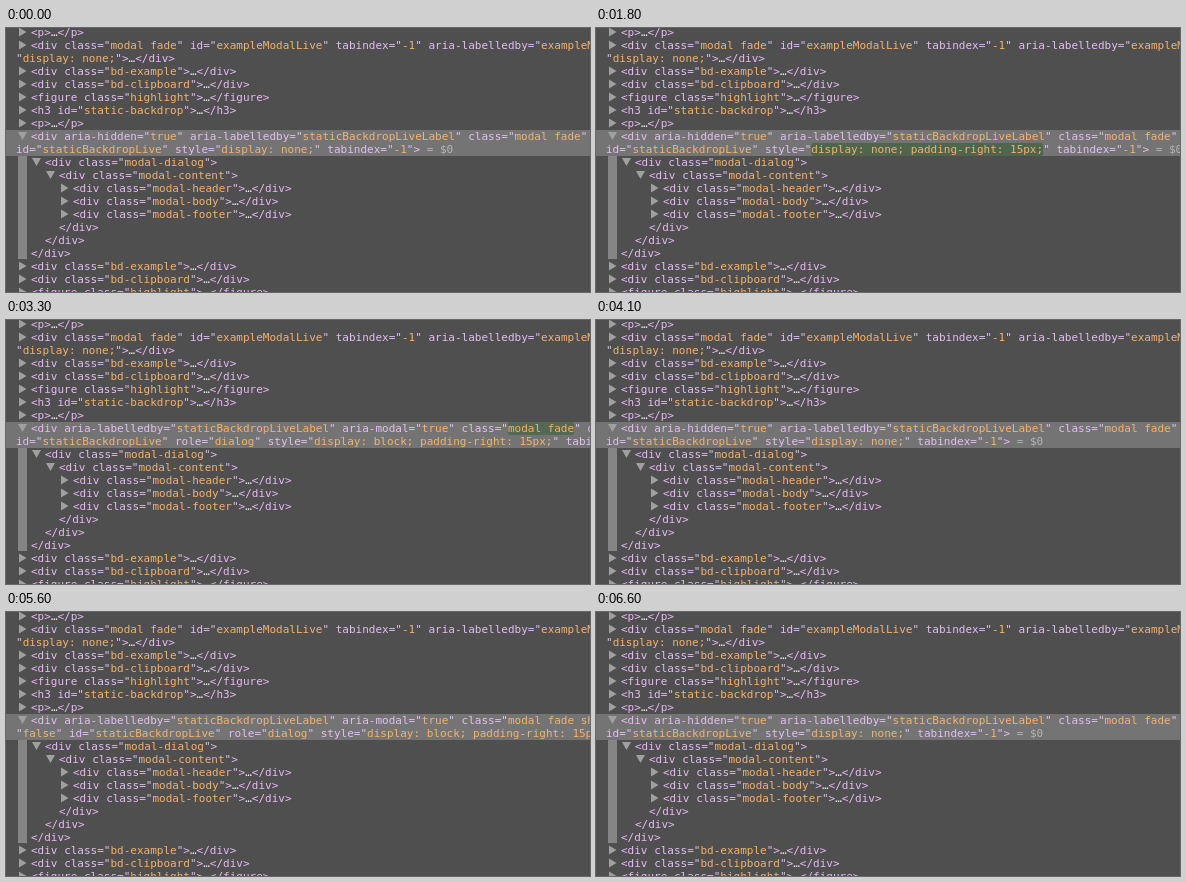
These frames come from a looping animation (584x264 px, 6.7 s). An HTML page:

```html
<!DOCTYPE html>
<html lang="en">
<head>
<meta charset="utf-8">
<title>Element inspector</title>
<style>
  html, body { margin: 0; width: 100%; height: 100%; overflow: hidden; background: #4f4f50; }
  svg { display: block; }
  text { font: 11px "DejaVu Sans Mono", monospace; white-space: pre; fill: #e8b9f4; }
  .attr { fill: #e2bff2; }
  .value { fill: #f3b26f; }
  .dots { fill: #e4e4e4; }
  .ref { fill: #b4b4b4; }
  .arrow { fill: #a0a0a0; }
  .flash { fill: #4b6549; }
</style>
</head>
<body>
<svg id="stage" width="584" height="264" viewBox="0 0 584 264">
  <rect width="584" height="264" fill="#4f4f50"/>
  <rect y="102" width="584" height="26" fill="#747474"/>
  <rect x="12" y="128" width="9" height="103" fill="#858585"/>
  <g id="tree"></g>
  <g id="flashes"></g>
  <g id="node"></g>
</svg>
<script>
const LOOP = 6700, FADE = 450, CHAR = 6.622, ROW = 13;
const byId = id => document.getElementById(id);
const centre = row => 4 + row * ROW;
const esc = s => s.replace(/&/g, '&amp;').replace(/</g, '&lt;').replace(/>/g, '&gt;');
const span = (cls, s) => `<tspan class="${cls}">${esc(s)}</tspan>`;

// Colour attribute names, quoted values, ellipses and the console reference
function paint(line) {
  return line.replace(/([\w-]+=)?"([^"]*)"|…| = \$0|[^"…=]+?(?=[\w-]+="|…| = \$0|$)|./g,
    (part, name, value) =>
      value !== undefined ? span('attr', (name || '') + '"') + span('value', value) + span('attr', '"')
      : part === '…' ? span('dots', part)
      : part === ' = $0' ? span('ref', part)
      : esc(part));
}

const textAt = (x, row, line) => `<text x="${x}" y="${centre(row) + 4}">${paint(line)}</text>`;

function arrow(x, row, open) {
  const y = centre(row);
  const d = open ? `M${x - 13} ${y - 4}h9l-4.5 8z` : `M${x - 12} ${y - 4.5}v9l7.5 -4.5z`;
  return `<path class="arrow" d="${d}"/>`;
}

const div = cls => `<div class="${cls}">…</div>`;

// row, indent level (-1 for a wrapped line), arrow (+ closed, - open), markup
const rows = [
  [0, 0, '+', '<p>…</p>'],
  [1, 0, '+', '<div class="modal fade" id="exampleModalLive" tabindex="-1" aria-labelledby="exampleModalLiveLabel"'],
  [2, -1, '', '"display: none;">…</div>'],
  [3, 0, '+', div('bd-example')],
  [4, 0, '+', div('bd-clipboard')],
  [5, 0, '+', '<figure class="highlight">…</figure>'],
  [6, 0, '+', '<h3 id="static-backdrop">…</h3>'],
  [7, 0, '+', '<p>…</p>'],
  [8, 0, '-', ''],
  [10, 1, '-', '<div class="modal-dialog">'],
  [11, 2, '-', '<div class="modal-content">'],
  [12, 3, '+', div('modal-header')],
  [13, 3, '+', div('modal-body')],
  [14, 3, '+', div('modal-footer')],
  [15, 2, '', '</div>'],
  [16, 1, '', '</div>'],
  [17, 0, '', '</div>'],
  [18, 0, '+', div('bd-example')],
  [19, 0, '+', div('bd-clipboard')],
  [20, 0, '+', '<figure class="highlight">…</figure>']
];

byId('tree').innerHTML = rows.map(([row, level, mark, line]) => {
  const x = level < 0 ? 10 : 25 + level * 14;
  return (mark ? arrow(x, row, mark === '-') : '') + textAt(x, row, line);
}).join('');

const LABEL = 'aria-labelledby="staticBackdropLiveLabel"';
const DATA = 'data-backdrop="static" data-keyboard=';
const ID = 'id="staticBackdropLive"';
const PAD = 'padding-right: 15px;';
const END = 'tabindex="-1"> = $0';
const hiddenTop = `<div aria-hidden="true" ${LABEL} class="modal fade" ${DATA}"false"`;
const shownTop = `<div ${LABEL} aria-modal="true" class="modal fade`;
const shownEnd = `${ID} role="dialog" style="display: block; ${PAD}" ${END}`;

const states = {
  closed: [hiddenTop, `${ID} style="display: none;" ${END}`],
  hidden: [hiddenTop, `${ID} style="display: none; ${PAD}" ${END}`],
  fading: [`${shownTop}" ${DATA}"false"`, shownEnd],
  open: [`${shownTop} show" ${DATA}`, `"false" ${shownEnd}`]
};

// time, state, attributes that light up
const steps = [[0, 'closed', []]];
for (const [show, hide] of [[200, 1600], [2100, 3200], [4600, 5900]]) {
  steps.push(
    [show, 'open', ['aria-modal', 'class', 'role', 'style']],
    [hide, 'fading', ['class']],
    [hide + 150, 'hidden', ['style']],
    [hide + 300, 'closed', ['style']]
  );
}

function flash(lines, attr) {
  return lines.map((line, i) => {
    const hit = line.match(new RegExp(`\\b${attr}="([^"]*)"`));
    if (!hit) return '';
    const x = (i ? 10 : 25) + (hit.index + attr.length + 2) * CHAR;
    return `<rect class="flash" x="${x}" y="${102 + i * ROW}" width="${hit[1].length * CHAR}" height="13" rx="2"/>`;
  }).join('');
}

let current;
function draw(t) {
  const step = steps.filter(s => s[0] <= t).pop();
  const [start, name, attrs] = step;
  if (step !== current) {
    current = step;
    const lines = states[name];
    byId('node').innerHTML = textAt(25, 8, lines[0]) + textAt(10, 9, lines[1]);
    byId('flashes').innerHTML = attrs.map(a => flash(lines, a)).join('');
  }
  byId('flashes').setAttribute('opacity', Math.max(0, 1 - (t - start) / FADE));
}

const begin = performance.now();
function tick() {
  draw((performance.now() - begin) % LOOP);
  requestAnimationFrame(tick);
}
tick();
</script>
</body>
</html>
```
